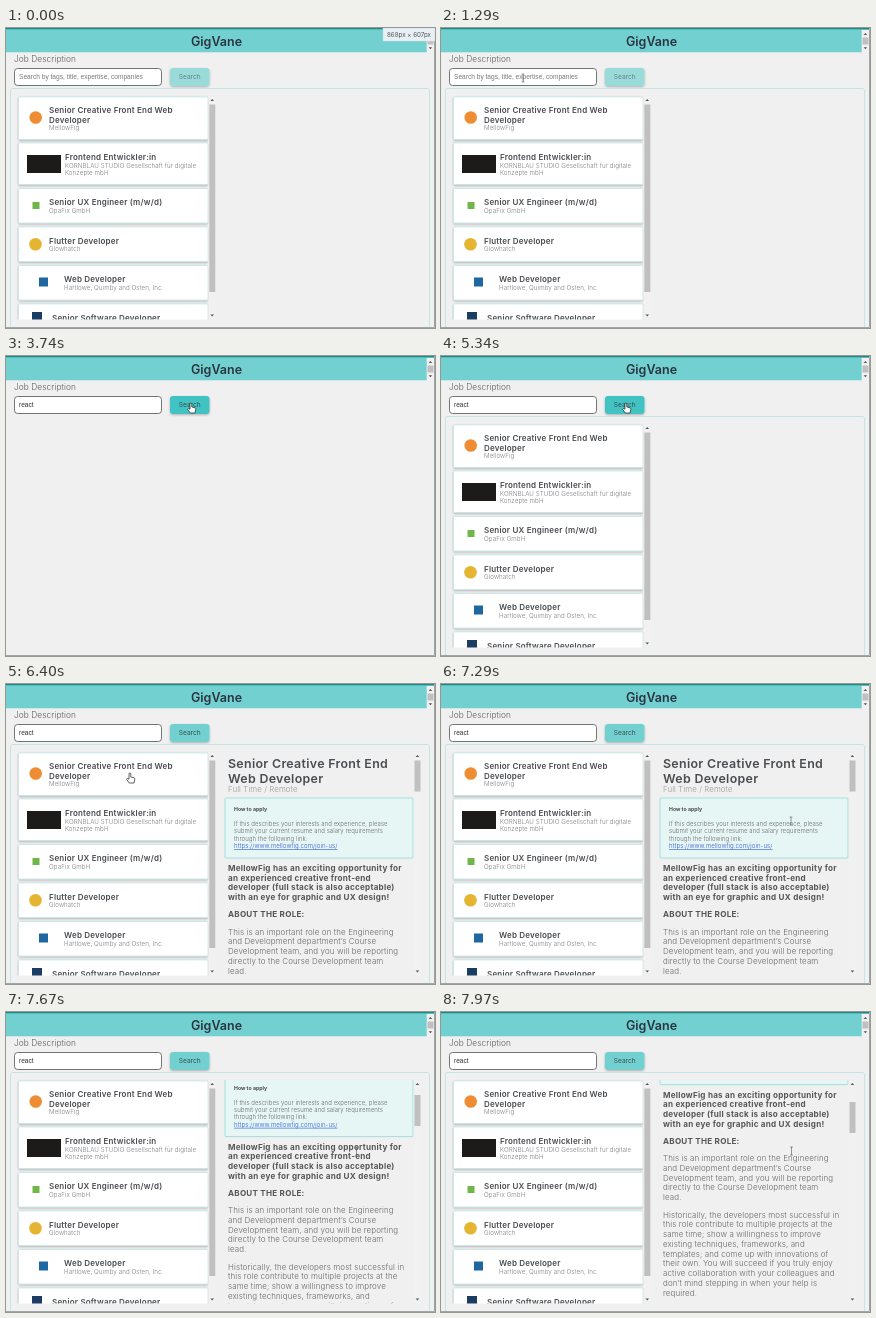
An HTML page that plays this animation: 429 by 300 pixels, repeating every 8 s.

```html
<!DOCTYPE html>
<html lang="en">
<head>
<meta charset="utf-8">
<title>GigVane</title>
<style>
html, body { margin: 0; width: 100%; height: 100%; overflow: hidden; background: #f0f0f0; }
svg { display: block; width: 429px; height: 300px; }
text { font-family: Inter, "Open Sans", sans-serif; white-space: pre; }
.brand { font-size: 12.5px; font-weight: 600; fill: #2b3440; text-anchor: middle; }
.label { font-size: 8.3px; font-weight: 300; fill: #5c5c5c; letter-spacing: .01em; }
.field { font: 6.6px "Liberation Sans", Arial, sans-serif; }
.go { font-size: 6.6px; fill: #3c4a4c; text-anchor: middle; }
.title { font-size: 8px; font-weight: 600; fill: #484b4f; letter-spacing: .025em; }
.firm { font-size: 6.2px; font-weight: 300; fill: #7d7d7d; letter-spacing: .015em; }
.head { font-size: 12.4px; font-weight: 600; fill: #4a4d50; letter-spacing: .025em; }
.kind { font-size: 7.8px; font-weight: 300; fill: #9a9a9a; letter-spacing: .015em; }
.how { font-size: 5.2px; font-weight: 700; fill: #484848; }
.note { font-size: 6px; font-weight: 300; fill: #686868; letter-spacing: .01em; }
.link { font-size: 6.1px; font-weight: 300; fill: #2f57d6; letter-spacing: .01em; text-decoration: underline; }
.strong { font-size: 8.1px; font-weight: 700; fill: #565656; letter-spacing: .03em; }
.body { font-size: 7.95px; font-weight: 300; fill: #686868; letter-spacing: .015em; }
.tip { font-size: 6.2px; fill: #555; text-anchor: middle; }
</style>
</head>
<body>
<svg viewBox="0 0 429 300" xmlns="http://www.w3.org/2000/svg">
  <defs>
    <clipPath id="listClip"><rect x="11" y="67" width="199" height="224.5"/></clipPath>
    <clipPath id="jobClip"><rect x="217" y="68" width="191" height="223.5"/></clipPath>
    <filter id="lift" x="-5%" y="-20%" width="110%" height="150%">
      <feDropShadow dx="0" dy="1" stdDeviation=".8" flood-color="#000" flood-opacity=".28"/>
    </filter>
  </defs>
  <rect width="429" height="300" fill="#f0f0f0"/>
  <g id="header"></g>
  <g id="search">
    <rect id="input" x="8.5" y="40.5" width="147" height="17" rx="3" fill="#fff"/>
    <text id="query" class="field" x="13" y="49" dy=".36em"></text>
    <path id="caret" d="M0 45v8" stroke="#111" stroke-width=".8"/>
    <rect id="button" x="164" y="40" width="39.5" height="18" rx="3" filter="url(#lift)"/>
    <text id="go" class="go" x="183.7" y="49" dy=".36em">Search</text>
  </g>
  <g id="panel">
    <rect x="4.5" y="60.5" width="419" height="260" rx="2" fill="none" stroke="#bfe4e3" stroke-width=".9"/>
    <g id="list" clip-path="url(#listClip)"></g>
    <g id="listBar"></g>
    <g id="job">
      <g clip-path="url(#jobClip)"><g id="page"></g></g>
      <g id="jobBar"></g>
    </g>
  </g>
  <path d="M428.5 0V299.5H0" fill="none" stroke="#a3a6a6"/>
  <g id="cursor">
    <path id="beam" d="M-1.4 -4H1.4M0 -4V4M-1.4 4H1.4" fill="none" stroke="#555" stroke-width=".6"/>
    <path id="hand" d="M-1 -3.5q1 -1 1.8 0V0L4 .8q1 .3 .8 1.4L4 6H-.8L-3.4 2.2q.6 -1.4 2.4 0z" fill="#fff" stroke="#222" stroke-width=".7"/>
    <path id="arrow" d="M0 0V8.5L2 6.7L3.4 9.6L4.6 9L3.3 6.2H6z" fill="#fff" stroke="#222" stroke-width=".6"/>
  </g>
  <g id="tip"></g>
</svg>
<script>
const LOOP = 8000;
const $ = id => document.getElementById(id);

// y is the vertical middle of the first line
const text = (cls, x, y, lines, step = 0) => [].concat(lines).map((line, i) =>
  `<text class="${cls}" x="${x}" y="${y + i * step}" dy=".36em">${line}</text>`).join('');
const rect = (x, y, w, h, fill, extra = '') =>
  `<rect x="${x}" y="${y}" width="${w}" height="${h}" fill="${fill}" ${extra}/>`;
const circle = (x, y, r, fill) => `<circle cx="${x}" cy="${y}" r="${r}" fill="${fill}"/>`;
const tri = (x, y, dir) =>
  `<path d="M${x - 1.8} ${y + dir}h3.6l-1.8 ${-2 * dir}z" fill="#555"/>`;
const bar = (x, top, bottom, thumbY, thumbH, id = '') =>
  rect(x, top, 7.5, bottom - top, '#f1f1f1') + tri(x + 3.7, top + 4, 1) + tri(x + 3.7, bottom - 4, -1) +
  rect(x + .8, thumbY, 6, thumbH, '#c0c0c0', id && `id="${id}"`);

$('header').innerHTML =
  rect(0, 2, 421, 22.3, '#72d1d0') + rect(0, 0, 429, 1.6, '#0f8f8e') +
  text('brand', 210.5, 13.3, 'GigVane') + bar(420.7, 2, 24.3, 9.5, 7) +
  text('label', 8, 31, 'Job Description');

$('tip').innerHTML = rect(377, 0, 52, 13, '#e9f0f5', 'stroke="#ccd5dc" stroke-width=".5"') +
  text('tip', 403, 6.7, '868px × 607px');

const cards = [
  { y: 69, h: 42.5, x: 43, at: 82, title: ['Senior Creative Front End Web', 'Developer'], firm: 'MellowFig',
    logo: circle(29.7, 89.5, 6.3, '#ef8d35') },
  { y: 115, h: 41.5, x: 59, at: 129, title: ['Frontend Entwickler:in'],
    firm: ['KORNBLAU STUDIO Gesellschaft für digitale', 'Konzepte mbH'],
    logo: rect(21, 127, 34, 18, '#1d1a1a') },
  { y: 160.5, h: 34.5, x: 43, at: 174, title: ['Senior UX Engineer (m/w/d)'], firm: 'OpaFix GmbH',
    logo: rect(26.5, 174, 7, 7, '#72b64a') },
  { y: 199, h: 34.5, x: 43, at: 212.7, title: ['Flutter Developer'], firm: 'Glowhatch',
    logo: circle(29.5, 216.3, 6.3, '#e6b433') },
  { y: 237.5, h: 34.5, x: 58, at: 251, title: ['Web Developer'], firm: 'Hartlowe, Quimby and Osten, Inc.',
    logo: rect(33, 249.5, 9, 9, '#1f67a0') },
  { y: 276, h: 34.5, x: 46, at: 289.8, title: ['Senior Software Developer'], firm: '',
    logo: rect(26, 284, 10, 10, '#1d3c63') },
];
$('list').innerHTML = cards.map(c =>
  rect(12.5, c.y, 189.5, c.h, '#fff', 'rx="1" stroke="#b5e2e1" stroke-width=".6" filter="url(#lift)"') + c.logo +
  text('title', c.x, c.at, c.title, 9.75) +
  text('firm', c.x, c.at + 8.5 + 9.75 * (c.title.length - 1), c.firm, 7.3)).join('');
$('listBar').innerHTML = bar(202.5, 68, 291.5, 76.5, 187.5);

const LINE = 9.75;
$('page').innerHTML =
  text('head', 222, 79.5, ['Senior Creative Front End', 'Web Developer'], 14.6) +
  text('kind', 222, 104.8, 'Full Time / Remote') +
  rect(219, 114, 188, 60, '#e6f6f5', 'rx="1" stroke="#9cdddc" stroke-width=".9"') +
  text('how', 228, 125.5, 'How to apply') +
  text('note', 228, 140, [
    'If this describes your interests and experience, please',
    'submit your current resume and salary requirements',
    'through the following link:'], 7.3) +
  text('link', 228, 162, 'https://www.mellowfig.com/join-us/') +
  text('strong', 222, 184, [
    'MellowFig has an exciting opportunity for',
    'an experienced creative front-end',
    'developer (full stack is also acceptable)',
    'with an eye for graphic and UX design!'], LINE) +
  text('strong', 222, 230.3, 'ABOUT THE ROLE:') +
  text('body', 222, 247.7, [
    'This is an important role on the Engineering',
    'and Development department’s Course',
    'Development team, and you will be reporting',
    'directly to the Course Development team',
    'lead.'], LINE) +
  text('body', 222, 304.2, [
    'Historically, the developers most successful in',
    'this role contribute to multiple projects at the',
    'same time; show a willingness to improve',
    'existing techniques, frameworks, and',
    'templates; and come up with innovations of',
    'their own. You will succeed if you truly enjoy',
    'active collaboration with your colleagues and',
    'don’t mind stepping in when your help is',
    'required.'], LINE);
$('jobBar').innerHTML = bar(407.7, 68, 291.5, 76.5, 31, 'jobThumb');

// Each track is a list of [start time, value...]; values hold until the next entry.
const hold = (track, t) => track.reduce((now, key) => key[0] <= t ? key : now);

const query = [[0, ''], [1770, 'r'], [2070, 're'], [2270, 'rea'], [2660, 'reac'], [3170, 'react']];
const button = [[0, '#9adbda'], [1770, '#86d6d5'], [1870, '#72d1d0'], [3450, '#5acaca'],
  [3540, '#43c3c3'], [6310, '#5acaca'], [6400, '#72d1d0']];
const scroll = [[0, 0], [7480, 8], [7580, 36], [7670, 49.4], [7870, 80], [7970, 101.3]];
const cursor = [
  [0, ''], [810, 'arrow', 190, 8], [900, 'arrow', 140, 22], [1000, 'beam', 104, 44], [1090, 'beam', 87, 50],
  [1290, 'beam', 82, 50], [1770, ''],
  [3170, 'beam', 139.5, 54], [3260, 'beam', 150, 53], [3360, 'arrow', 160, 49], [3450, 'hand', 176, 51],
  [3540, 'hand', 185, 51],
  [5430, 'hand', 183, 53], [5530, 'arrow', 176, 60], [5630, 'hand', 164, 72], [5720, 'hand', 150, 82],
  [5820, 'hand', 138, 88], [5920, 'hand', 130, 91], [6010, 'hand', 126, 93], [6110, 'hand', 124, 93],
  [7010, 'hand', 150, 97], [7100, 'arrow', 226, 110], [7200, 'beam', 310, 128], [7290, 'beam', 350, 137],
  [7390, 'beam', 350.5, 139]];

const show = (id, on) => $(id).setAttribute('visibility', on ? 'inherit' : 'hidden');
const set = (id, attrs) => Object.entries(attrs).forEach(([k, v]) => $(id).setAttribute(k, v));

function draw(t) {
  const typed = hold(query, t)[1];
  const focused = t >= 1490 && t < 3540;
  const field = $('query');
  field.textContent = typed || 'Search by tags, title, expertise, companies';
  field.setAttribute('fill', typed ? '#333' : '#7a7a7a');
  set('input', { stroke: focused ? '#111' : '#666', 'stroke-width': focused ? 1.4 : .9 });
  show('caret', focused);
  set('caret', { transform: `translate(${13.4 + (typed ? field.getComputedTextLength() : 0)})` });
  set('button', { fill: hold(button, t)[1] });
  set('go', { opacity: t < 1770 ? .6 : 1 });

  // Results are cleared while the search is pending.
  show('panel', t < 3740 || t >= 5340);
  show('job', t >= 6310);
  show('tip', t < 810);

  const offset = hold(scroll, t)[1];
  set('page', { transform: `translate(0 ${-offset})` });
  set('jobThumb', { y: 76.5 + offset * .133 });

  const [, shape, x = 0, y = 0] = hold(cursor, t);
  ['beam', 'hand', 'arrow'].forEach(id => show(id, id === shape));
  set('cursor', { transform: `translate(${x} ${y})` });
}

const start = performance.now();
function tick() {
  draw((performance.now() - start) % LOOP);
  requestAnimationFrame(tick);
}
tick();
</script>
</body>
</html>
```
